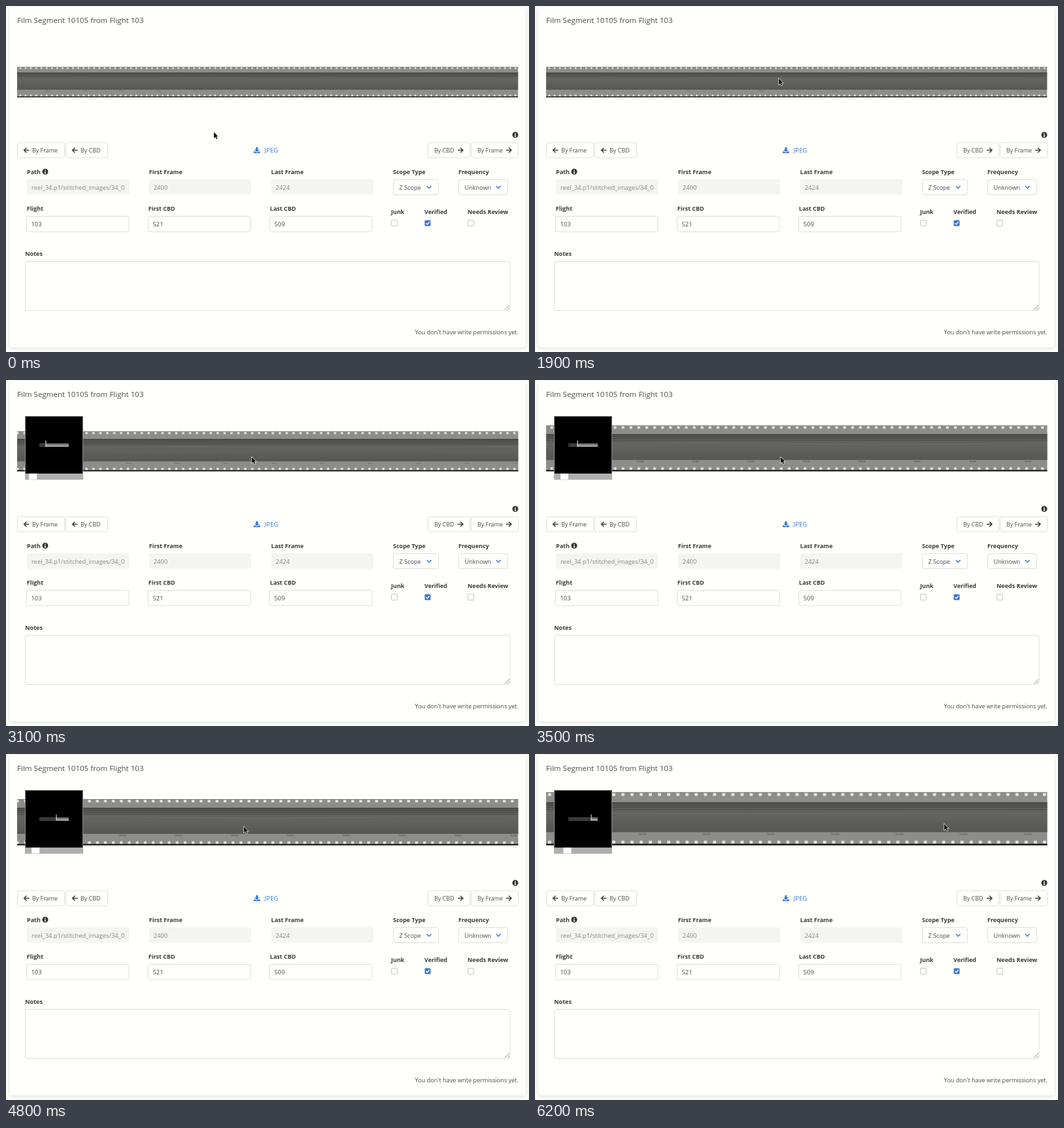
An HTML page with a canvas for the animation above (6.3 s loop, 800 by 529 pixels).

```html
<!DOCTYPE html>
<html lang="en">
<head>
<meta charset="utf-8">
<title>Film segment viewer</title>
<style>
  html, body { margin: 0; width: 100%; height: 100%; overflow: hidden; background: #fcfdf8; }
  svg, canvas { position: absolute; left: 0; top: 0; width: 800px; height: 529px; }
  .card { position: absolute; left: 5px; top: 2px; width: 790px; height: 520px; border-radius: 5px;
          background: #fffffb; box-shadow: 0 1px 6px rgba(10, 10, 10, .13); }
  text { font: 9.15px "Open Sans", "Noto Sans", sans-serif; fill: #4a4a4a; }
  .title { font-size: 11.57px; }
  .label { font-size: 9px; font-weight: 700; fill: #3b3b3b; }
  .value { font-size: 9.4px; }
  .muted { font-size: 9.4px; fill: #868684; }
  .button { font-size: 8.95px; }
  .link { font-size: 9.7px; fill: #3a76d2; }
  .box { fill: #fffffc; stroke: #dededa; }
  .disabled { fill: #f4f4f2; }
  .icon { fill: none; stroke: #3f3f3f; stroke-width: 1.5; }
  .blue { stroke: #3a76d2; }
</style>
</head>
<body>
<div class="card"></div>
<svg id="ui" viewBox="0 0 800 529"></svg>
<canvas id="stage" width="800" height="529"></canvas>
<script>
// ---- Static form ----
const parts = [];
const text = (x, y, content, cls = "", anchor = "start") =>
  parts.push(`<text x="${x}" y="${y}" class="${cls}" text-anchor="${anchor}">${content}</text>`);
const box = (x, y, w, h, cls = "box") =>
  parts.push(`<rect x="${x}" y="${y}" width="${w}" height="${h}" rx="2.5" class="${cls}"/>`);
const path = (d, cls = "icon") => parts.push(`<path d="${d}" class="${cls}"/>`);
const info = (x, y) => {
  parts.push(`<circle cx="${x}" cy="${y}" r="4.5" fill="#333"/>`);
  parts.push(`<path d="M${x} ${y - 3}v1.5M${x - 1} ${y - .3}h1v2.6m-1.2 0h2.4" stroke="#fff" stroke-width="1.2" fill="none"/>`);
};
const button = (x, w, label, pointsRight) => {
  const dir = pointsRight ? 1 : -1, tail = pointsRight ? x + w - 18 : x + 18.5;
  box(x + .5, 209, w, 23);
  text(x + (pointsRight ? 10 : 23), 224, label, "button");
  path(`M${tail} 220.5h${8 * dir}m${-4 * dir} -3.8l${4 * dir} 3.8l${-4 * dir} 3.8`);
};
const select = (x, w, name, value) => {
  text(x, 257, name, "label");
  box(x + .5, 265.5, w, 23);
  text(x + 9.5, 280.5, value);
  path(`M${x + w - 17} 275.3l3.3 3.4l3.3 -3.4`, "icon blue");
};
const checkbox = (x, name, checked) => {
  text(x, 318, name, "label");
  const style = checked ? 'fill="#3a76d2"' : 'fill="#fff" stroke="#c6c6c3"';
  parts.push(`<rect x="${x + .5}" y="327.5" width="9" height="9" rx="1.5" ${style}/>`);
  if (checked) parts.push(`<path d="M${x + 2.5} 332l2 2l3.2 -4" fill="none" stroke="#fff" stroke-width="1.4"/>`);
};

text(17, 25.5, "Film Segment 10105 from Flight 103", "title");
info(779, 197);
button(17, 72, "By Frame", false);
button(91, 64, "By CBD", false);
button(645, 64, "By CBD", true);
button(711, 72, "By Frame", true);
parts.push('<path d="M382.3 216h3v3.5h2.3l-3.8 3.8l-3.8 -3.8h2.3zM379 222.3h2.2l1.5 1.4h2.2l1.5 -1.4h2.2v2.8h-9.6z" fill="#3a76d2"/>');
text(395.5, 224, "JPEG", "link");

["Path", "First Frame", "Last Frame"].forEach((name, i) => {
  const x = 32 + i * 186.8;
  text(x, 257, name, "label");
  box(x, 265, 156.5, 23.5, "disabled");
  text(x + 7, 280.5, ["reel_34.p1/stitched_images/34_0", "2400", "2424"][i], "muted");
});
info(60, 253.3);
["Flight", "First CBD", "Last CBD"].forEach((name, i) => {
  const x = 31.5 + i * 186;
  text(x + .3, 313.3, name, "label");
  box(x, 321.5, 156.5, 23.5);
  text(x + 7, 337, ["103", "521", "509"][i], "value");
});
select(592, 69, "Scope Type", "Z Scope");
select(692, 75, "Frequency", "Unknown");
checkbox(589, "Junk", false);
checkbox(640, "Verified", true);
checkbox(706, "Needs Review", false);
text(29.3, 382, "Notes", "label");
box(29.5, 390.5, 741.5, 75);
parts.push('<path d="M763 464.5l7 -7M767 464.5l3 -3" stroke="#777" stroke-width=".9"/>');
text(784, 502, "You don't have write permissions yet.", "", "end");
document.getElementById("ui").innerHTML = parts.join("");

// ---- Motion rules ----
const DURATION = 6300, STEP = 100;
const ramp = (t, from, to) => Math.min(1, Math.max(0, (t - from) / (to - from)));
const smooth = k => k * k * (3 - 2 * k);
const settle = k => 1 - (1 - k) ** 5;

// Pointer moves: start, end, destination
const MOVES = [
  [600, 1300, 351, 114], [1300, 1600, 451, 163], [1600, 1900, 373, 111], [2100, 2300, 376, 118],
  [4000, 4100, 500, 113], [4100, 4800, 364, 111], [4800, 5400, 528, 104], [5500, 5600, 626, 107]
];
function pointerAt(t) {
  let x = 318, y = 193;
  for (const [from, to, endX, endY] of MOVES) {
    const k = ramp(t, from, to);
    x += (endX - x) * k;
    y += (endY - y) * k;
  }
  return [x, y];
}

// Zooming keeps the film point under the pointer in place; dragging pans.
function viewAt(t) {
  const base = 1 + .31 * smooth(ramp(t, 2500, 3100)) + .205 * settle(ramp(t, 3200, 3900));
  const zoom = base + .225 * ramp(t, 5900, 6200);
  const pan = 126 * smooth(ramp(t, 4000, 5130));
  return { zoom, offset: 359 * (1 - 1 / base) + pan + 609 * (1 / base - 1 / zoom) };
}

// ---- Viewer ----
const ctx = document.getElementById("stage").getContext("2d");
const LEFT = 17, WIDTH = 766.5, BOTTOM = 139.5, HEIGHT = 46.5;
const LABEL_GAP = 56.4, HOLE_GAP = LABEL_GAP / 7;
const rect = (color, x, y, w, h) => { ctx.fillStyle = color; ctx.fillRect(x, y, w, h); };

const body = ctx.createLinearGradient(0, 9, 0, 35);
body.addColorStop(0, "#60615d");
body.addColorStop(.5, "#62635f");
body.addColorStop(1, "#565753");

function drawFilm({ zoom, offset }) {
  ctx.save();
  ctx.beginPath();
  ctx.rect(LEFT, 50, WIDTH, 100);
  ctx.clip();
  ctx.translate(LEFT - offset * zoom, BOTTOM - HEIGHT * zoom);
  ctx.scale(zoom, zoom);
  rect("#8d8e8a", 0, 0, WIDTH, HEIGHT);
  rect("#70716d", 0, 0, WIDTH, .5);
  rect(body, 0, 8.8, WIDTH, 26.2);
  for (let n = 0; n < 4; n++) rect(`rgba(40, 41, 38, ${.75 - n * .15})`, 0, 8.8 + n * 1.9, WIDTH, .9);
  rect("#0b0b0a", 0, 45.3, WIDTH, 1.2);

  // faint echo trace
  ctx.lineWidth = .4;
  ctx.strokeStyle = "rgba(150, 151, 145, .35)";
  ctx.beginPath();
  for (let x = 0; x <= WIDTH; x += 6) ctx.lineTo(x, 18.5 + Math.sin(x / 60) * .5);
  ctx.stroke();

  ctx.fillStyle = "#dfe0da";
  ctx.beginPath();
  for (let x = 3.5; x < WIDTH; x += HOLE_GAP) {
    ctx.roundRect(x, .7, 2.9, 2.5, .6);
    ctx.roundRect(x, 42.5, 2.9, 2.5, .6);
  }
  ctx.fill();

  ctx.fillStyle = "#3c3d39";
  ctx.font = '1.7px "Open Sans", sans-serif';
  ctx.textAlign = "center";
  for (let x = 46.5, n = 2400; x < WIDTH; x += LABEL_GAP, n += 2) ctx.fillText("103 " + n, x, 37.4);
  ctx.restore();
}

function drawNavigator({ zoom, offset }, alpha) {
  const x = 51 + offset * .117;
  ctx.save();
  ctx.globalAlpha = alpha;
  rect("#8a8a88", 29, 55, 89, 88);
  rect("#000", 30, 56, 87, 87);
  rect("#b0aeae", 29, 143, 89, 9.5);
  rect("#fff", 29.2 + 19.4 * (zoom - 1), 143, 12, 9);
  rect("#4d4e4b", 51, 97, 45, 5);
  rect("#2c2d2a", 51, 98.5, 45, 2);
  rect("#777873", x, 97, 96 - x, 4);
  rect("#f4f4f4", x - .5, 92.5, 1, 9);
  rect("#f4f4f4", x - .5, 100.6, 96.5 - x, 1);
  ctx.restore();
}

const ARROW = new Path2D("M0 0V9.6L2.3 7.5L3.9 11L5.5 10.3L3.9 6.9H6.8Z");
function drawPointer([x, y]) {
  ctx.save();
  ctx.translate(x, y);
  ctx.scale(.95, .95);
  ctx.lineWidth = 1.3;
  ctx.strokeStyle = "#f4f4f0";
  ctx.stroke(ARROW);
  ctx.fillStyle = "#111";
  ctx.fill(ARROW);
  ctx.restore();
}

function draw(now) {
  const t = Math.floor((now % DURATION) / STEP) * STEP;
  const view = viewAt(t);
  ctx.clearRect(0, 0, 800, 529);
  drawFilm(view);
  drawNavigator(view, ramp(t, 2500, 2900));
  drawPointer(pointerAt(t));
}

const start = performance.now();
function tick() {
  draw(performance.now() - start);
  requestAnimationFrame(tick);
}
tick();
</script>
</body>
</html>
```
